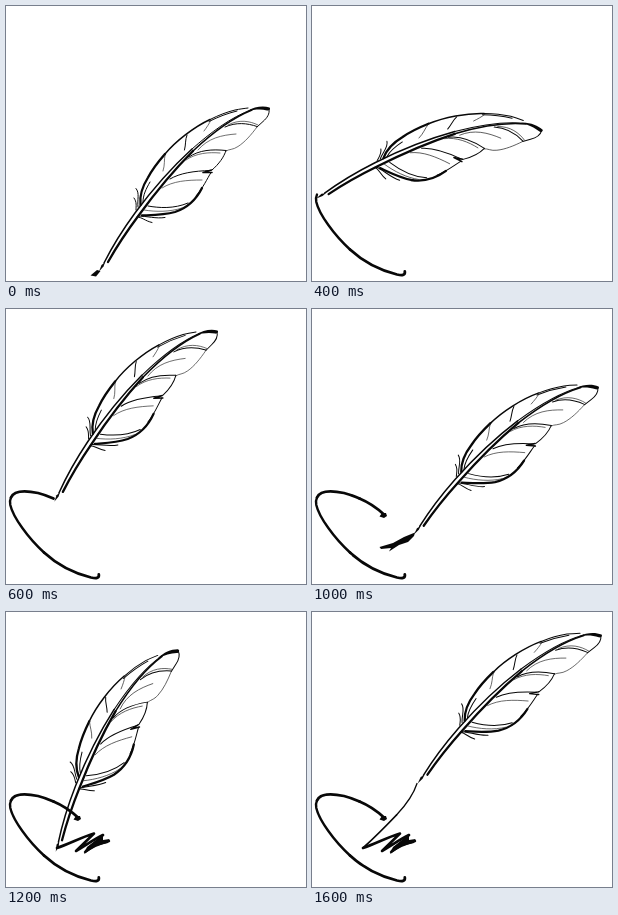
These frames come from a looping animation (300 px wide and 275 px high, 3400 ms). An HTML page:

```html
<!DOCTYPE html>
<html lang="en">
<head>
<meta charset="utf-8">
<title>Quill writing</title>
<style>
  html, body { margin: 0; width: 100%; height: 100%; overflow: hidden; background: #fff; }
  svg { display: block; width: 100vw; height: 100vh; }
  path { fill: none; stroke: #080808; stroke-linecap: round; stroke-linejoin: round; }
  .solid { fill: #080808; stroke: none; }
  .hair { stroke-width: .7; stroke: #333; }
  .thin { stroke-width: 1; }
  .line { stroke-width: 1.5; }
  .bold { stroke-width: 2.3; }
</style>
</head>
<body>
<svg viewBox="0 0 300 275">
  <g id="ink"></g>
  <g id="quill">
    <!-- shaft and nib -->
    <path class="solid" d="M93 265.5 L95.5 259 L99 256.5 L97.5 260.5 Z"/>
    <path class="line" d="M98 257 C107 239 118 222 129 207 C146 184 163 164 186 143"/>
    <path class="thin" d="M186 143 C204 127 225 111 246 103.5"/>
    <path class="bold" d="M102 256 C111 240 121 225 133 209 C149 187 166 166 187 145"/>
    <path class="line" d="M187 145 C205 128 226 112 246 104"/>
    <path class="solid" d="M241 105 C249 100.5 257 99.5 263.5 101.5 C265 103 263 105 261 104.5 C255 103 249 103.5 241 105 Z"/>

    <!-- upper vane -->
    <path class="bold" d="M134.5 199 C133.5 191 136 181 142 171.5 C146 164 152 156 159 148"/>
    <path class="line" d="M159 148 C170 135 188 121 204 113.5"/>
    <path class="thin" d="M204 113.5 C213 109 221 106 229 104 C234 103 238 102.5 242 102"/>
    <path class="thin" d="M203 115.5 C213 110.5 221 107.5 231 105"/>
    <path class="thin" d="M137 196 C137 189 140 183 144 176 M181 129 C179 134 180 138 178.5 144"/>
    <path class="hair" d="M159 149 C158 154 159 159 157 165 M205 114 C203 118 201 121 198 125"/>
    <path class="thin" d="M130 182.5 C134 187 131 194 132 201 M128 192 C131 196 130 200 130 204"/>

    <!-- lower vane -->
    <path class="thin" d="M263 103 C264 108 261 112 257 115.5 L251 121"/>
    <path class="hair" d="M251 121 C245 129 239 136 232 140.5 C227 144 223 143 220 145"/>
    <path class="thin" d="M220 144.5 C218 151 213 158 206 164"/>
    <path class="line" d="M205.5 164 L197 166.5 L206 166.5"/>
    <path class="thin" d="M205 166.5 C201 173 197 182 190 190"/>
    <path class="bold" d="M196 182 C190 194 181 202 169 206 C158 209 148 209 136 209.5"/>
    <path class="hair" d="M222 119 C233 113 244 115 252 119"/>
    <path class="thin" d="M219 121 C230 116 241 117 251 120.5"/>
    <path class="hair" d="M192 144 C202 132 216 129 230 128"/>
    <path class="thin" d="M183 151 C193 144 206 143 220 144.5"/>
    <path class="hair" d="M180 154 C190 147 203 146 214 147"/>
    <path class="thin" d="M164 173 C174 167 188 165 204 164.5"/>
    <path class="hair" d="M156 182 C167 175 181 174 196 174"/>
    <path class="thin" d="M142 200 C153 202 168 203 182 197"/>
    <path class="hair" d="M138 204 C150 206 164 206 176 202"/>
    <path class="thin" d="M132 210 C141 210 150 213 159 211.5 M131 211 C136 211 139 215 146 216.5"/>
  </g>
</svg>
<script>
const LOOP = 3400, STEP = 200, LAST = 8;
const TIP = [263, 102];

// Feather end point, turn in degrees
const poses = [
  [263, 102, 0],
  [169, 44, -12.8],
  [230, 124, 27],
  [211, 22, -2.5],
  [299, 160, 23.8],
  [286, 78, 5.2],
  [172, 38, -14.9],
  [291, 93, 16],
  [289, 23, 4.9]
];

// Each piece: [path, width, first pose, last pose]; width 0 is a filled shape
const pieces = [
  ["M84.5 269.5 L91 264 L94.5 265 L90 270.5 Z", 0, 0, 0],
  ["M92.8 265.5 C93.5 269.5 90 269.5 85 268.5 C67 264 51 255.5 38 243.5", 2.8, 1, LAST],
  ["M38 243.5 C22 229 7 208 4.3 196 C3.7 193 4 190.5 5 188.5", 2.4, 2, LAST],
  ["M5 188.5 C8 181.5 20 181.5 32 184 C38 185.5 43 187.5 47.5 189.5", 2.8, 3, LAST],
  ["M47.5 189.5 C57 193.5 65 199 72 205.5", 2.8, 4, LAST],
  ["M67.5 207.5 L70 204 L74 204 L75 207 L72 209 Z", 0, 4, LAST],
  ["M68 238 L80 234 L84 236 L77 242 L79 239 L69 240 Z", 0, 4, 4],
  ["M67.5 238 L81 234 L92 228 L103 223.5 L102 227 L96 233 L87 236 L77 242.5 L79 239 L69 240 Z", 0, 5, 5],
  ["M51 236 C63 232 76 225 88 221.5 L70 239 C79 234 88 227 97 223", 2.6, 6, LAST],
  ["M97 223 C91 229 85 234 79 240 C87 234 95 231 103 229", 2.4, 6, LAST],
  ["M94 225 L97 224 L97 228 L103.5 227 L102 231 L90 234 L78 242 L81 235 Z", 0, 6, LAST],
  ["M51 236 C62 226 74 214 84.5 203", 1.8, 7, LAST],
  ["M84.5 203 C93 194 101 184 105 171.5", 1.3, 8, LAST]
];

const ink = document.getElementById("ink");
const quill = document.getElementById("quill");

const strokes = pieces.map(([d, width, from, to]) => {
  const el = document.createElementNS("http://www.w3.org/2000/svg", "path");
  el.setAttribute("d", d);
  if (width) el.style.strokeWidth = width;
  else el.setAttribute("class", "solid");
  ink.append(el);
  return { el, from, to };
});

function draw(ms) {
  const i = Math.min(LAST, Math.floor((ms % LOOP) / STEP));
  const [x, y, turn] = poses[i];
  quill.setAttribute("transform",
    `translate(${x} ${y}) rotate(${turn}) translate(${-TIP[0]} ${-TIP[1]})`);
  for (const { el, from, to } of strokes) {
    el.style.display = i >= from && i <= to ? "" : "none";
  }
}

const start = performance.now();
function tick() {
  draw(performance.now() - start);
  requestAnimationFrame(tick);
}
tick();
</script>
</body>
</html>
```
